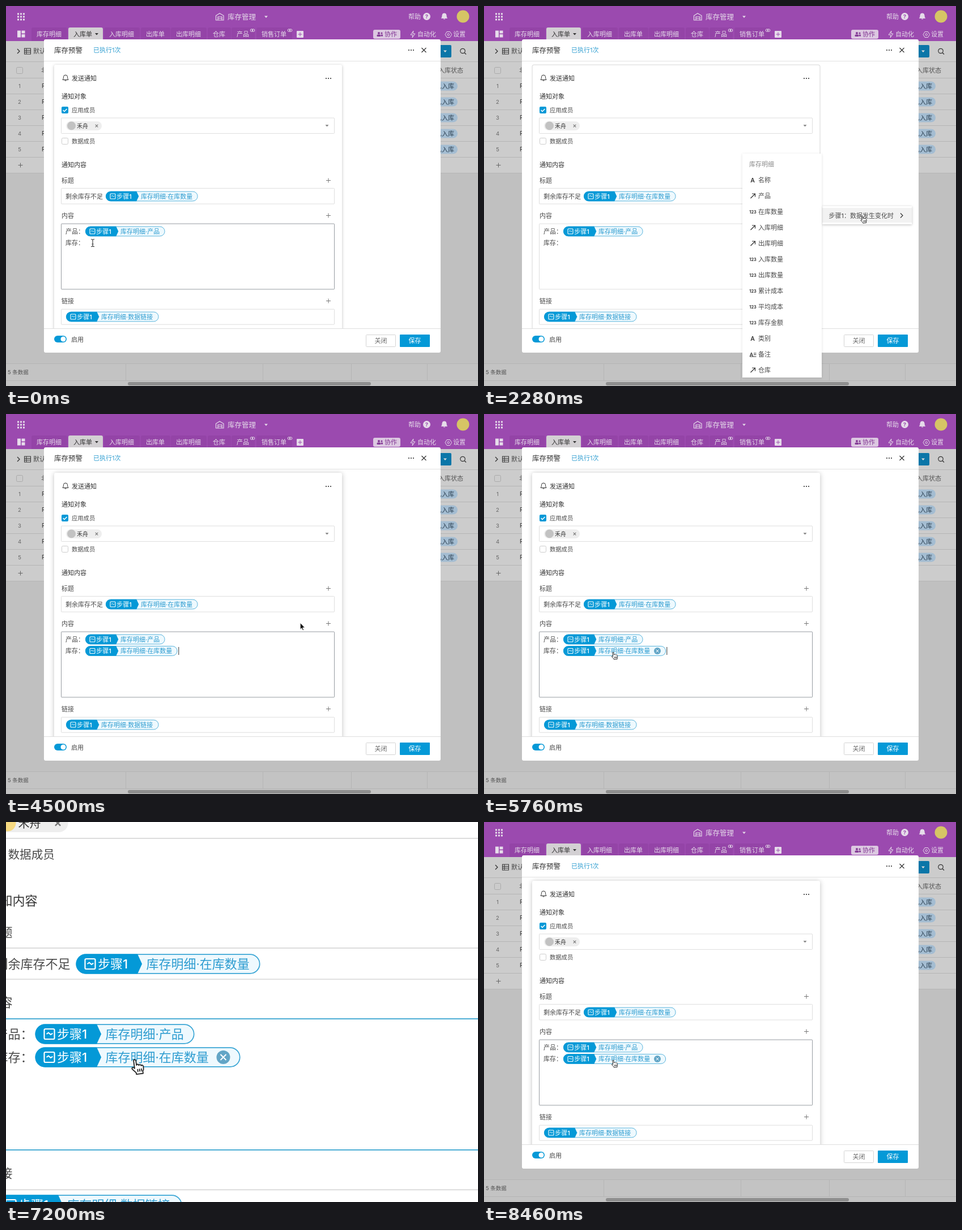
An HTML page that plays this animation: 833 px wide and 672 px high, repeating every 8520 ms.

```html
<!DOCTYPE html>
<html lang="zh-CN">
<head>
<meta charset="utf-8">
<style>
html, body { margin: 0; width: 100%; height: 100%; overflow: hidden; background: #c0c0c0 }
svg { display: block; font-family: Inter, "Noto Sans CJK SC", "Noto Sans CJK JP", sans-serif }
</style>
</head>
<body>
<svg id="svg" width="833" height="672" viewBox="0 0 833 672"></svg>
<script>
const BLUE = '#0499d7', INK = '#333', PURPLE = '#9b4aaf', LOOP = 8520;
const $ = id => document.getElementById(id);

// y is the vertical centre of the text
const text = (x, y, s, size = 11, fill = '#4a4a4a', weight = 400, anchor = 'start') =>
  `<text x="${x}" y="${y + size * .38}" font-size="${size}" fill="${fill}" font-weight="${weight}" text-anchor="${anchor}">${s}</text>`;
const rect = (x, y, w, h, fill, more = '') =>
  `<rect x="${x}" y="${y}" width="${w}" height="${h}" fill="${fill}" ${more}/>`;
const line = (d, stroke = INK, w = 1, more = '') =>
  `<path d="${d}" fill="none" stroke="${stroke}" stroke-width="${w}" ${more}/>`;
const dot = (x, y, r, fill, more = '') => `<circle cx="${x}" cy="${y}" r="${r}" fill="${fill}" ${more}/>`;
const box = (x, y, w, h, more = '') => rect(x, y, w, h, '#fff', `rx="1" stroke="#d8d8d8" stroke-width=".85" ${more}`);
const down = (x, y, fill) => `<path d="M${x - 3} ${y - 1.5}h6l-3 3.5z" fill="${fill}"/>`;
const plus = (x, y, c = '#777', r = 4) => line(`M${x - r} ${y}h${2 * r}M${x} ${y - r}v${2 * r}`, c);
const cross = (x, y, r, c, w = 1) => line(`M${x - r} ${y - r}l${2 * r} ${2 * r}m0 ${-2 * r}l${-2 * r} ${2 * r}`, c, w);
const more = (x, y) => [-4, 0, 4].map(d => dot(x + d, y, 1.1, INK)).join('');
const bell = (x, y, fill, stroke) =>
  `<path d="M${x - 5} ${y + 3}q1.5-1.5 1.5-5a3.5 3.5 0 0 1 7 0q0 3.500 1.500 5zm3.500 1.500h3" fill="${fill}" stroke="${stroke}"/>`;

function pill(x, y, w, label, closable) {
  return rect(x + .4, y - 8.4, w - .3, 16.8, '#eef9fe', 'rx="8.4" stroke="#3ba6d5" stroke-width=".85"') +
    `<path d="M${x + 8.800} ${y - 8.8}h45.500l4 8.800-4 8.800h-45.500a8.800 8.800 0 0 1 0-17.600z" fill="${BLUE}"/>` +
    rect(x + 8, y - 4.5, 9, 9, 'none', 'rx="1" stroke="#fff" stroke-width="1.1"') +
    line(`M${x + 10} ${y}l1.700-1.200 2 1.700 1.700-1.200`, '#fff') +
    text(x + 19.2, y, '步骤1', 11, '#fff', 500) +
    text(x + 62, y, label, 11, '#2d9cd0') +
    (closable ? dot(x + 166, y, 6, '#62a5c6') + cross(x + 166, y, 2.5, '#fff', 1) : '');
}

function page() {
  const pale = '#e6dcea', grid = '#b5b5b5';
  let s = rect(0, 0, 833, 672, '#c0c0c0') + rect(0, 62, 833, 233, '#cccccc') + rect(0, 0, 833, 62, PURPLE);
  for (let i = 0; i < 9; i++) s += rect(20 + i % 3 * 5, 12.5 + (i / 3 | 0) * 5, 3, 3, pale);
  s += line('M370.500 25v-8l6.500-4 7 4v8zM374 25v-6h7v6M374 22h7', pale, 1.2) +
    text(391, 19, '库存管理', 12.5, pale, 500) + down(459, 19, pale) +
    text(710, 19, '帮助', 11, pale) + dot(742.5, 18.5, 6.5, pale) +
    text(742.5, 18.5, '?', 9.5, PURPLE, 700, 'middle') +
    bell(773.5, 18.5, pale, pale) + dot(806.5, 18.5, 11, '#d6c565');
  s += rect(20, 43.5, 6, 12, pale) + rect(27.5, 43.5, 6, 5, pale) + rect(27.5, 50, 6, 5.500, pale);
  const tabs = [['库存明细', 54], ['入库单', 119], ['入库明细', 182], ['出库单', 247], ['出库明细', 300],
    ['仓库', 365], ['产品', 407], ['销售订单', 451]];
  for (const [label, x] of tabs) {
    const on = x === 119;
    const w = on ? 61 : label.length * 11 + 19;
    s += `<path d="M${x - 9} 62v-21q0-3 3-3h${w - 6}q3 0 3 3v21z" fill="${on ? '#d3d0d3' : '#9444a7'}"/>` +
      text(x, 49.5, label, 11, on ? INK : pale, on ? 500 : 400);
  }
  s += down(160, 49.5, INK);
  for (const x of [435, 501])
    s += dot(x - 1.5, 43, 2.3, 'none', `stroke="${pale}"`) + dot(x + 1.5, 43, 2.3, 'none', `stroke="${pale}"`);
  s += rect(513, 44, 12, 12, pale, 'rx="1"') + plus(519, 50, PURPLE, 3.5) +
    rect(648, 42, 48, 16, '#dcc8e1', 'rx="3"') +
    dot(658, 48, 2, '#843a96') + rect(654.5, 50.5, 7, 3.5, '#843a96', 'rx="1.5"') + dot(663, 48, 1.6, '#843a96') +
    rect(662, 50.5, 3, 3, '#843a96') + text(668, 50, '协作', 11, '#843a96', 500) +
    line('M719 44l-5 7h4l-1 5 5-7h-4z', pale) + text(726, 50, '自动化', 11, pale) +
    line('M778 45.500h5.500l3 5-3 5h-5.500l-3-5z', pale) + dot(780.7, 50.5, 1.8, 'none', `stroke="${pale}"`) +
    text(789, 50, '设置', 11, pale);
  // toolbar and table
  s += line('M20 76l4 4-4 4', INK, 1.3) + rect(32.5, 75, 11, 10, 'none', `stroke="${INK}"`) +
    line('M32 78.500h12M32 81.500h12M36 75v10', INK) + text(48, 80, '默认视图', 11) +
    rect(740, 69, 46, 22, '#0a76a8', 'rx="2"') + down(775, 80, '#ddd') +
    dot(806, 79.5, 4.2, 'none', `stroke="${INK}" stroke-width="1.2"`) + line('M809 82.500l3 3', INK, 1.2);
  for (let y = 98.5; y < 296; y += y < 99 ? 29 : 28) s += line(`M0 ${y}H833`, grid);
  s += rect(18.5, 108.5, 11, 11, 'none', 'rx="2" stroke="#aaa"') + text(62, 113.5, '北区', 10, '#555') +
    text(763, 113.5, '入库状态', 11, '#555');
  for (let i = 0; i < 5; i++) {
    const y = 141.5 + 28 * i;
    s += text(24, y, i + 1, 9.5, '#666', 400, 'middle') + text(63, y, 'R', 10, INK) +
      rect(748, y - 8, 49, 16, '#a4bdd2', 'rx="8"') + text(758, y, '已入库', 11, '#2d4254');
  }
  s += plus(25.5, 281.5, '#666') + rect(0, 632, 833, 40, '#c3c3c3') + line('M0 632.500H833M0 662.500H833', grid);
  for (const x of [212, 454, 610, 744]) s += line(`M${x - .5} 632V662`, grid);
  return s + text(3, 647, '5 条数据', 9.5, '#555') + rect(215, 665, 429, 6, '#8e8e8e', 'rx="3"');
}

function dialog() {
  let s = rect(67, 59, 700, 554, '#fff', 'rx="3"') + text(85, 78, '库存预警', 12.5, INK, 500) +
    text(154, 78, '已执行1次', 11, '#35a0d2') + more(715, 78) + cross(737.5, 78, 4, INK, 1.2) +
    line('M67 97.500H767', '#e2e2e2') + '<g clip-path="url(#body)">' +
    rect(85, 104, 508, 500, '#fff', 'id="card" rx="3"') + bell(105, 127.5, 'none', INK) +
    text(116, 128, '发送通知', 11, INK, 500) + more(569, 128) + text(98, 160, '通知对象', 11, INK, 500) +
    rect(98, 178, 12, 12, BLUE, 'rx="2"') + line('M100.500 184l2.500 2.500 4.500-4.500', '#fff', 1.5) +
    text(116, 184, '应用成员', 10.3) + box(97.5, 198, 482, 27.4) +
    rect(106, 204, 63, 16, '#eeeeee', 'rx="8"') + dot(115.5, 211.8, 7.5, '#c2c2c2', 'id="face"') +
    text(125, 212, '禾舟', 10, INK) + cross(160, 212, 2.3, '#777', 1.2) + down(566.5, 211.5, '#888') +
    rect(98.5, 233.5, 11, 11, '#fff', 'rx="2" stroke="#ccc"') + text(116, 239.5, '数据成员', 10.3) +
    text(98, 280.5, '通知内容', 11, INK, 500) + text(98, 308.5, '标题') + box(97.5, 322.4, 482, 27.6) +
    text(105, 336.5, '剩余库存不足') + pill(176, 336.5, 162, '库存明细·在库数量') +
    text(98, 370.5, '内容') + box(97.5, 385.1, 482, 115.8, 'id="area"') +
    text(105, 398.5, '产品：') + pill(140, 398.5, 140, '库存明细·产品') + text(105, 419, '库存：') +
    text(98, 521.5, '链接') + box(97.5, 536.2, 482, 27) + pill(106, 549.5, 163, '库存明细·数据链接') +
    [308.5, 370.5, 521.5].map(y => plus(569, y)).join('') + '</g>';
  return s + line('M67 570.500H767', '#dedede') + rect(85, 583, 22, 12, BLUE, 'rx="6"') + dot(101, 589, 4.5, '#fff') +
    text(115, 589.5, '启用') + rect(635.5, 581.5, 52, 21, '#fff', 'rx="1" stroke="#d4d4d4"') +
    text(661.5, 592, '关闭', 11, '#666', 400, 'middle') + rect(695, 581, 53, 22, BLUE, 'rx="1"') +
    text(721.5, 592, '保存', 11, '#fff', 500, 'middle');
}

const fields = ['A名称', '>产品', '#在库数量', '>入库明细', '>出库明细', '#入库数量', '#出库数量',
  '#累计成本', '#平均成本', '#库存金额', 'A类别', '=备注', '>仓库'];
const shade = alpha => `style="filter:drop-shadow(0 1px 2px rgba(0,0,0,${alpha}))"`;

function fieldIcon(kind, y) {
  if (kind === '>') return line(`M470.500 ${y + 4}l7.500-7.500M473 ${y - 4}h5.500v5.500`, INK, 1.2);
  if (kind === '#') return text(474.5, y, '123', 7.2, INK, 700, 'middle');
  if (kind === 'A') return text(474, y, 'A', 10.5, INK, 600, 'middle');
  return text(468.5, y, 'A', 9.5, INK, 600) + line(`M476 ${y - 2}h4.500m-4.500 2.500h4.500M469 ${y + 4}h11.500`, INK);
}

function stepPanel(open) {
  return rect(597, 354, 158, 32, '#fff', shade(.25)) + (open ? rect(597, 357, 158, 26, '#f2f2f2') : '') +
    text(608.5, 370.5, '步骤1：数据发生变化时') + line('M735 366.500l4 4-4 4', INK, 1.2);
}

function fieldMenu([x, y]) {
  const row = Math.floor((y - 294) / 28);
  let s = rect(456, 261, 140, 396, '#fff', shade(.12)) + text(468, 280, '库存明细', 11, '#8a8a8a');
  if (x < 596) s += rect(456, 294 + row * 28, 140, 28, '#eeeeee');
  fields.forEach((f, i) => s += fieldIcon(f[0], 308 + 28 * i) + text(484, 308 + 28 * i, f.slice(1)));
  return s;
}

const cursors = {
  hand: `<g transform="translate(-.8 -.8) rotate(-8)" stroke="#222" stroke-width=".9" stroke-linejoin="round"><path fill="#fff" d="M-1 7V1Q-1 0 0 0Q1 0 1 1V5Q1.300 4.200 2.200 4.400Q3 4.600 3 5.400Q3.500 4.700 4.200 5Q5 5.200 5 6Q5.600 5.400 6.200 5.800Q6.800 6 6.800 7V8.500Q6.800 10 5.800 11V13H-.2V11.600L-3.200 8Q-3.600 7-2.800 6.600Q-2 6.400-1 7.600Z"/><path d="M1.500 8.500v2.500m1.700-2.500v2.500m1.700-2.500v2.500"/></g>`,
  beam: line('M-3-6.500Q0-6.500 0-5Q0-6.500 3-6.500M0-5V5M-3 6.500Q0 6.500 0 5Q0 6.500 3 6.500M-1.500 2h3', '#333', 1.1),
  arrow: '<path d="M0 0V12l2.700-2.500 1.800 4.200 1.900-.8-1.800-4.100h3.700z" fill="#111" stroke="#fff" stroke-width=".9"/>'
};

const ease = p => (p = Math.min(1, Math.max(0, p)), p * p * (3 - 2 * p));
// start, end, x, y of every pointer move
const moves = [[350, 1250, 567, 376], [1650, 2150, 668, 372], [2700, 3250, 531, 367], [4400, 5250, 228.5, 422]];
const clicks = [[1420, 569, 371], [3510, 532, 366]];

function pointer(t) {
  let p = [153, 419];
  for (const [a, b, x, y] of moves) {
    const k = ease((t - a) / (b - a));
    p = [p[0] + (x - p[0]) * k, p[1] + (y - p[1]) * k];
  }
  return p;
}

function frame(now) {
  const t = now % LOOP, p = pointer(t), [x, y] = p;
  const inside = (l, top, r, b) => x >= l && x <= r && y >= top && y <= b;
  const stepOpen = t > 1620 && t < 3780, menuOpen = t > 2100 && t < 3780;
  const picked = t > 3840, focused = t < 1420 || picked;
  const onPill = picked && inside(140, 410, 320, 428);
  const onPlus = !stepOpen && inside(558, 360, 580, 382);
  const zoom = 1 + ease((t - 6480) / 405) - ease((t - 7708) / 405);
  const near = zoom > 1.02;

  $('stage').setAttribute('transform', `translate(228.5 422) scale(${zoom}) translate(-228.5 -422)`);
  $('face').setAttribute('fill', near ? '#f6d981' : '#c2c2c2');
  $('area').setAttribute('stroke', !focused ? '#d8d8d8' : near ? '#35a3cf' : '#858b92');
  const blur = t < 1800 ? 2.5 : picked ? 4 : 0;
  $('card').setAttribute('stroke', blur ? 'none' : '#d6d6d6');
  $('card').style.filter = blur ? `drop-shadow(0 1px ${blur}px rgba(0,0,0,.25))` : 'none';

  let s = '';
  if (onPlus) s += rect(558, 360, 22, 22, t > 1420 ? '#d4d4d4' : '#ececec');
  if (picked) s += pill(140, 419, onPill ? 180.5 : 162, '库存明细·在库数量', onPill);
  if (t % 1000 >= 500 && (t < 1620 || picked))
    s += line(`M${!picked ? 138.5 : onPill ? 322.8 : 304.8} 412v14`, '#333', 1);
  if (stepOpen) s += stepPanel(menuOpen);
  if (menuOpen) s += fieldMenu(p);
  for (const [start, cx, cy] of clicks) {
    const age = t - start;
    if (age >= 0 && age < 300)
      s += dot(cx, cy, 3 + age * .11, `rgba(0,0,0,${Math.max(0, .25 * (1 - age / 150))})`,
        `stroke="#fff" stroke-width="2" stroke-opacity="${age < 110 ? 0 : 1 - (age - 110) / 190}"`);
  }
  if (onPlus) s += plus(569, 370.5, '#999');
  const overMenu = stepOpen && (inside(597, 354, 755, 386) || menuOpen && inside(456, 261, 596, 657));
  const kind = onPill || onPlus || overMenu ? 'hand' : inside(98, 385, 579, 501) ? 'beam' : 'arrow';
  $('live').innerHTML = s + `<g transform="translate(${x} ${y})">${cursors[kind]}</g>`;
  requestAnimationFrame(() => frame(performance.now()));
}

$('svg').innerHTML = `<clipPath id="body"><rect x="67" y="98" width="700" height="472"/></clipPath>
  <g id="stage">${page()}${dialog()}<g id="live"></g></g>`;
frame(performance.now());
</script>
</body>
</html>
```
